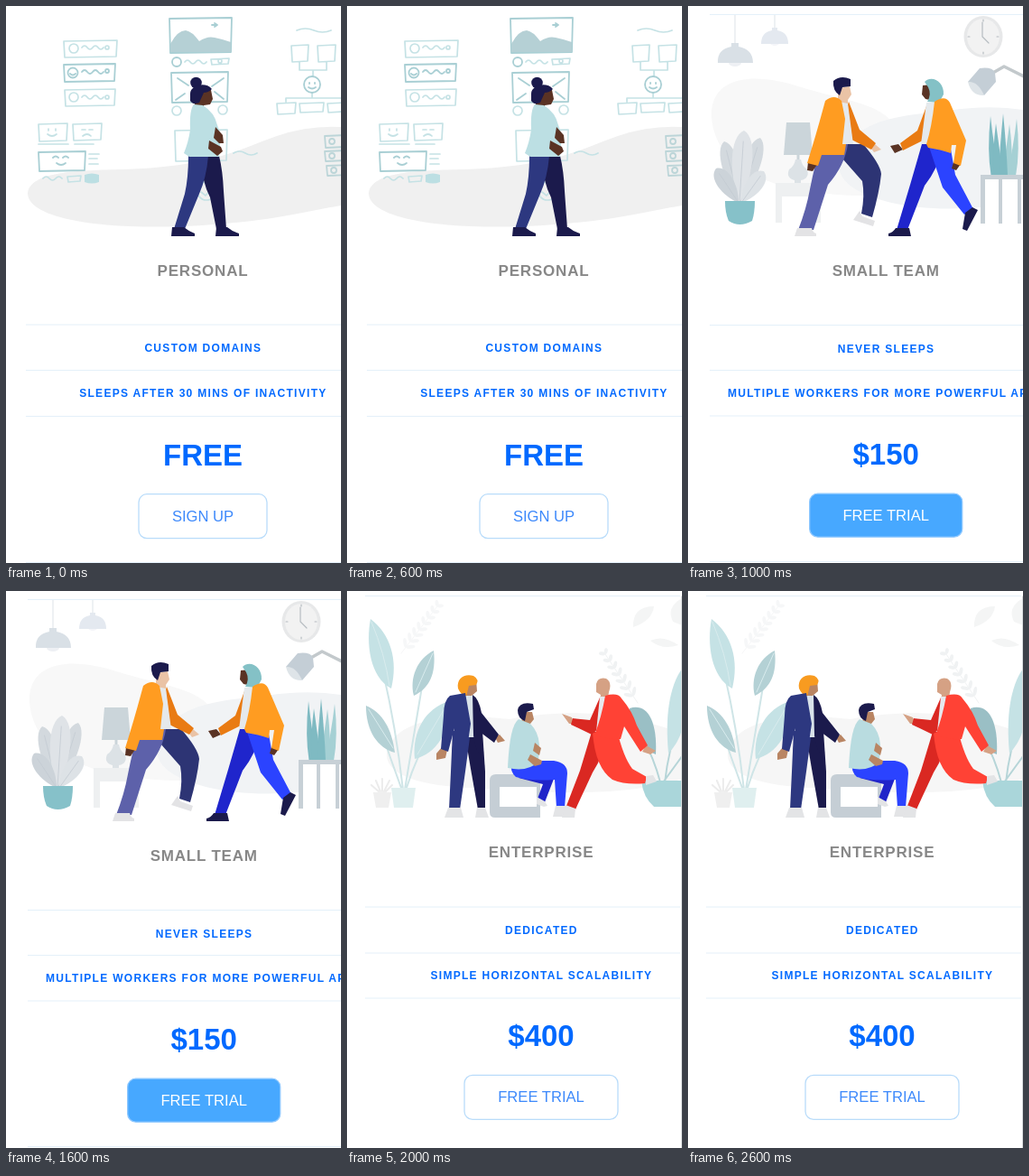
An HTML page that plays this animation: 371x617 px, repeating every 3 s.

```html
<!DOCTYPE html>
<html lang="en">
<head>
<meta charset="utf-8">
<title>Pricing plans</title>
<style>
html, body { margin: 0; width: 100%; height: 100%; overflow: hidden; background: #fff; }
svg { display: block; }
text { font-family: "Liberation Sans", Arial, sans-serif; text-anchor: middle; }
.title { font-size: 17px; font-weight: bold; letter-spacing: 0.8px; fill: #878787; }
.feature { font-size: 12px; font-weight: bold; letter-spacing: 1.3px; fill: #0069ff; }
.price { font-size: 33px; font-weight: bold; fill: #0069ff; }
.button { font-size: 16.6px; }
</style>
</head>
<body>
<svg id="stage" width="371" height="617" viewBox="0 0 371 617"></svg>
<script>
const fill = (color, d) => `<path fill="${color}" d="${d}"/>`;
const line = (color, width, d) =>
  `<path fill="none" stroke="${color}" stroke-width="${width}" stroke-linecap="round" stroke-linejoin="round" d="${d}"/>`;
const oval = (color, x, y, rx, ry = rx) => `<ellipse fill="${color}" cx="${x}" cy="${y}" rx="${rx}" ry="${ry}"/>`;
const text = (kind, x, y, label, color = "") =>
  `<text class="${kind}" x="${x}" y="${y}"${color && ` style="fill:${color}"`}>${label}</text>`;
const ring = (x, y, r) => `M${x - r} ${y}a${r} ${r} 0 1 1 ${2 * r} 0a${r} ${r} 0 1 1 ${-2 * r} 0`;
const box = (x, y, w, h) => `M${x} ${y + 1}L${x + w} ${y}L${x + w - 1} ${y + h - 1}L${x + 1} ${y + h}Z`;
const wave = (x, y, n, step = 6) => `M${x} ${y}q${step / 2} -4 ${step} 0` + `t${step} 0`.repeat(n - 1);

function fern(color, x, y, dx, dy, pairs) {
  let out = line(color, 1, `M${x} ${y}l${dx} ${dy}`);
  const tilt = Math.atan2(dy, dx) * 180 / Math.PI;
  for (let i = 1; i <= pairs; i++) {
    const k = i / pairs, size = 5.5 - 2 * k;
    for (const side of [-45, 45])
      out += `<g transform="translate(${x + dx * k} ${y + dy * k}) rotate(${tilt + side})">${oval(color, size, 0, size, 2)}</g>`;
  }
  return out;
}

// Rounded leaf from its base to its tip, w wide on each side
function leaf(color, bx, by, tx, ty, w) {
  const dx = tx - bx, dy = ty - by, len = Math.hypot(dx, dy);
  const nx = -dy / len * w, ny = dx / len * w;
  const at = (k, s) => `${bx + dx * k + nx * s} ${by + dy * k + ny * s}`;
  return fill(color, `M${bx} ${by}C${at(0.35, 1.2)} ${at(0.9, 1.5)} ${tx} ${ty}C${at(0.9, -1.5)} ${at(0.35, -1.2)} ${bx} ${by}`) +
    line("#c3cbd2", 0.8, `M${bx} ${by}L${at(0.85, 0)}`);
}

function plan({ left, cx, dy = 0, right = 371, rules, title, features, baselines, price, label, half, solid }) {
  const mid = cx + 0.4;
  const rule = rules.map(y => `M${left} ${y}H${right}`).join("");
  return `<path stroke="#e4f0f9" d="${rule}"/>` +
    text("title", mid - 0.4, 299 + dy, title) +
    features.map((f, i) => text("feature", mid, baselines[i], f)).join("") +
    text("price", cx, 508.5 + dy, price) +
    `<rect x="${cx - half}" y="${540.7 + dy}" width="${2 * half}" height="${solid ? 48 : 49}" rx="9"
      fill="${solid ? "#47a8ff" : "#fff"}" stroke="${solid ? "#8cc7ff" : "#b9dcfa"}" stroke-width="1.3"/>` +
    text("button", cx, 570.7 + dy, label, solid ? "#fff" : "#3d89fb");
}

const pale = "#c5e2e5", teal = "#a9cfd4", sky = "#bcdfe3", navy = "#2d3880", ink = "#1b1a4c", brown = "#5a3324";

function personalArt() {
  const light = [
    box(64, 38, 59, 19), box(65, 92, 56, 19), box(36, 130, 32, 20), box(74, 130, 32, 19),
    ring(75, 47, 5), wave(84, 46, 4), ring(112, 46, 2), ring(75, 101, 5), wave(84, 101, 4), ring(112, 101, 2),
    "M36 153H69M76 153H97M47 136v2M55 136v2M46 142q5 4 10 0M84 137h4M92 137h4M85 144q5-4 9 0",
    "M92 164h11M92 169h9M92 175h10", wave(41, 191, 3, 7), box(68, 188, 15, 7),
    box(187, 137, 58, 35), wave(252, 163, 2, 13), ring(222, 205, 10), "M216 206l5 4 8-9",
    wave(322, 27, 2, 19), box(316, 43, 19, 19), box(345, 43, 20, 19),
    "M325 62V71H355V62M340 71V78M339 96V102M310 106V102H371",
    box(300, 107, 21, 13), box(325, 107, 27, 11), box(356, 107, 20, 11),
    wave(198, 62, 4), box(227, 58, 20, 7), ring(237, 61, 2), ring(189, 116, 5), ring(240, 115, 5)
  ].join("");
  const dark = [
    box(64, 64, 57, 20), ring(74, 74, 5.5), "M71 75q3 3 6 0", wave(84, 73, 4), ring(112, 72, 2),
    box(36, 161, 52, 22), "M52 168q3-3 6 0M63 168q3-3 6 0M56 174q5 4 10 0",
    box(181, 13, 69, 39), ring(189, 62, 5), box(183, 73, 63, 34), "M190 80l12 8M241 80l-13 9M188 104l10-7M231 95l10 8",
    ring(339, 87, 9), "M336 85v1M342 85v1M335 90q4 3 8 0", "M228 21h6l-3-2m3 2l-3 2"
  ].join("");
  const edge = [box(353, 143, 24, 14), box(353, 160, 24, 12), box(355, 176, 24, 12),
    ring(361, 150, 3), ring(361, 166, 3), ring(363, 182, 3)].join("");
  return fill("#f0f0f0", "M24 208C26 183 80 182 130 181C230 178 262 157 300 144Q335 132 371 134V221C330 228 300 237 230 242C130 250 26 240 24 208Z") +
    line(pale, 1.7, light) + line(teal, 1.8, dark) + line("#bcd5d8", 1.8, edge) +
    fill("#b5d0d5", "M182 51V42Q190 27 199 27Q206 28 214 39Q223 33 231 35Q241 37 249 40V51Z") +
    fill(sky, "M87 187Q95 184 103 187V195Q95 198 87 195Z") +
    // walker
    fill(ink, "M215 166H236Q240 182 241 205L244 247H233L226 212Q217 195 215 166Z") +
    fill(navy, "M202 166H224Q222 190 214 208L198 247H186L198 208Q202 190 202 166Z") +
    fill(ink, "M184 245h13q6 5 12 7v3H183ZM233 245h12q6 5 13 7v3H232Z") +
    fill(brown, "M215 93H227L229 103L226 109L219 110L219 115L208 111Z") +
    oval(ink, 210.5, 85, 6.3) +
    fill(ink, "M204 97C204 88 221 83 228 92Q224 96 219 96L214 107Q207 110 204 105Z") +
    fill(sky, "M208 109L218 110Q231 118 234 132L238 143L236 167H203L197 163Q202 151 204 137Q203 115 208 109Z") +
    fill(brown, "M232 134L240 143L241 152L236 152L230 146ZM225 149L238 156L240 161L234 166L224 158Z");
}

function teamArt() {
  const blades = [[335, 122], [364, 125], [341, 130], [356, 131], [349, 119]];
  return fill("#f8f8f8", "M26 123C24 73 82 75 122 89C187 109 219 106 239 147C260 186 226 212 184 210C108 207 31 188 26 123Z") +
    fill("#f1f3f5", "M170 163C190 122 245 121 288 116Q333 109 371 115V216C313 228 239 229 193 207Q158 190 170 163Z") +
    line("#dde3e8", 1, "M52 10V42M96 10V25") +
    oval("#eef0f4", 52, 63, 7, 4) + oval("#f4f5f9", 96, 41, 5, 3) +
    fill("#d9e0e6", "M48 41h8v4Q72 48 72 63H33Q32 48 48 45Z") +
    fill("#e4e9f0", "M93 24h6v3Q111 29 111 42H81Q81 29 93 27Z") +
    oval("#e7e8e9", 327, 34, 21.5, 23) + oval("#f2f2f2", 327, 34, 18, 20) +
    line("#b6bcc1", 1.2, "M326 18V34L333 41M327 15v2M327 51v2M310 34h2M342 34h2") +
    line("#c3c9cc", 3.5, "M336 75L350 67L372 78") +
    fill("#c4ced6", "M310 84L323 69Q337 67 340 74L341 84L328 99Z") + fill("#dee4e8", "M310 84Q321 83 328 99Q314 100 310 84") +
    leaf("#d3d9de", 57, 217, 40, 150, 9) + leaf("#d3d9de", 58, 217, 80, 146, 9) +
    leaf("#dfe3e7", 57, 218, 62, 138, 11) + leaf("#ccd3d9", 56, 218, 31, 180, 9) + leaf("#dde2e6", 59, 218, 84, 183, 9) +
    fill("#86c1c9", "M41 216H74Q74 229 71 238Q57 246 45 238Q41 229 41 216Z") +
    fill("#eef0f1", "M97 196H147V240H141V211H104V240H97Z") +
    fill("#cbd5da", "M109 129H135L138 165H106Z") + line("#cbd5da", 3, "M122 165V174") +
    fill("#dce2e6", "M119 170h6Q126 177 132 181Q135 191 125 193v3h-7v-3Q108 190 112 181Q118 177 119 170") +
    blades.map(([x, y], i) => {
      const base = 349 + (x - 349) * 0.6;
      return fill(i % 2 ? "#a5d0d4" : "#7fbac2", `M${base - 5} 188Q${x - 4} 160 ${x} ${y}Q${x + 4} 160 ${base + 5} 188Z`);
    }).join("") +
    fill("#fff", "M326 190H371V241H326Z") +
    fill("#c7d0d6", "M324 187H371V192H324ZM324 192h5V241h-5ZM344 192h4V241h-4ZM365 192h4V241h-4Z") +
    // left partner
    fill("#2d3474", "M172 153H194Q213 175 214 186Q212 206 204 234L192 230Q196 210 193 194L171 169Z") +
    fill("#5d61aa", "M148 153H177Q174 176 155 198L139 248H122Q131 225 135 203Q141 172 148 153Z") +
    fill("#e3e3e5", "M121 246h16q1 5 5 6v3H118ZM190 227l3 6 14 5-2 6-22-7Z") +
    fill("#eac3a6", "M166 91L179 89L181 98L177 104L177 110L166 107Z") +
    fill(ink, "M161 83Q169 76 180 81V89L171 90L168 99Q160 94 161 83Z") +
    fill("#eac3a6", "M201 155L207 153L214 159L206 162Z") + fill(brown, "M133 173L144 174L138 183L132 182Z") +
    fill("#e97b13", "M178 106L190 137L208 152L203 159L181 148L173 122Z") +
    fill("#e5e9ec", "M167 106L177 108L183 153H165Z") +
    fill("#ff9c21", "M152 105Q162 97 170 105L174 125L171 153H175L173 165H148L144 177L132 174Q142 142 149 116Z") +
    // right partner
    fill("#1f25cc", "M259 153H284Q277 180 262 199L243 248H231L246 198Z") +
    fill("#2b43ff", "M266 153H290L296 187L316 225L306 231L282 201Z") +
    fill(ink, "M230 246h15l2 9H222v-3q5-1 8-6ZM315 223l6 3-12 23-5-2 3-18Z") +
    fill(brown, "M260 88L270 87L272 105L263 103L259 98ZM224 155L233 153L238 159L229 163ZM294 173l8 2-5 7-5-2Z") +
    fill("#84c1c6", "M262 84C270 76 284 84 283 98L278 107L265 106Q270 98 266 90Z") +
    fill("#e97b13", "M264 111L254 138L235 152L238 160L260 149L272 125Z") +
    fill("#e5e9ec", "M264 107H275L272 153H258Z") +
    fill("#ff9c21", "M273 106Q285 98 290 107L308 149L302 177L294 174L297 154H292L291 163Q280 159 266 157L264 153Q270 134 273 106Z");
}

function enterpriseArt() {
  const skin = "#b98563", tan = "#d5a184", red = "#ff4235", maroon = "#da2822";
  return fill("#f6f6f6", "M44 180C50 142 113 135 180 142C260 127 323 139 371 158V208C310 229 210 224 139 218C84 216 43 205 44 180Z") +
    fern("#f6f7f8", 60, 69, 40, -52, 8) + fern("#f0f2f3", 322, 124, -36, -54, 7) +
    fill("#f4f5f5", "M317 40Q316 17 340 17Q338 33 317 40ZM371 8Q353 18 361 34L371 38ZM336 55Q350 48 367 60Q349 66 336 55Z") +
    line("#cfe5e7", 2, "M62 220Q54 150 40 90M64 220Q73 165 84 100M60 218Q48 185 36 150M66 218Q76 185 98 146") +
    fill(pale, "M26 31C48 47 57 77 49 108C25 95 21 58 26 31ZM113 122C114 158 99 180 75 186C72 155 87 130 113 122Z") +
    fill("#b4d1d5", "M96 66C99 92 91 108 74 116C69 96 78 75 96 66ZM21 127C39 134 50 153 53 179C34 174 21 155 21 127Z") +
    line("#d9ecee", 1, "M27 34Q42 70 47 105M95 69L76 112M24 131L51 174M111 125L78 181") +
    fill("#dfefef", "M49 218H76L73 240H52Z") + fill("#efefef", "M29 223H49L46 240H32Z") +
    line("#ececec", 2, "M39 222V208M37 222L32 210M41 222L47 210M35 222L27 215M43 222L50 215") +
    line("#b6d5d8", 2, "M347 212Q340 185 326 160M352 212Q356 175 368 145M350 212L371 183") +
    fill("#9abfc5", "M313 130C331 124 344 141 342 181C323 174 312 154 313 130Z") +
    fill(pale, "M371 86C357 106 352 139 356 180Q367 168 371 154Z") +
    fill("#aad6da", "M326 210H371V239H340Q328 229 326 210Z") +
    fill("#c5ced5", "M165 203H207Q214 203 214 210V251H164Q158 251 158 245V210Q158 203 165 203Z") +
    fill("#fff", "M169 217H210V239H169Z") +
    // standing
    fill(ink, "M130 155H150L153 200V242H145L137 197Z") + fill(navy, "M117 155H137L131 200L125 242H113L115 200Z") +
    fill("#e3e4e6", "M112 240h14l3 11H108ZM144 240h9l4 11H142Z") +
    fill(skin, "M133 98H143L144 111L138 116V121L129 115ZM105 173L111 176L109 185L99 187L99 180ZM164 162L169 159L175 166L167 168Z") +
    fill("#f89b20", "M123 108C121 97 130 91 140 94Q147 98 143 104L135 105L132 117Q126 115 123 108Z") +
    fill("#d9e2e9", "M131 116H140L146 162H133Z") +
    fill(ink, "M139 115Q146 119 149 135L168 159L163 168L147 156L150 182Q143 181 140 160Z") +
    fill(navy, "M114 116L131 113L137 147L132 181H116L119 152L112 178L104 175L107 138Q107 121 114 116Z") +
    // seated
    fill("#2024c9", "M202 193L231 203L219 234L211 230L217 214L190 207Z") +
    fill("#2b43ff", "M182 188H229Q244 190 244 202L241 240H232L230 209Q203 211 187 206Q180 200 182 188Z") +
    fill("#e3e4e6", "M210 228l9 5 3 5-4 1-8-3ZM231 238h11q3 5 8 8v4h-22Z") +
    fill(skin, "M195 134H205L207 142L203 147V154L193 146Z") +
    fill(ink, "M189 132Q191 122 206 125L207 131L199 134L197 144Q189 141 189 132Z") +
    fill("#b9dce0", "M190 142L203 147Q212 156 213 170L212 189Q200 201 178 196Q180 149 190 142Z") +
    fill(skin, "M208 168L215 174L213 182L206 177ZM203 181L216 188L215 192L208 194L200 187Z") +
    // striding
    fill(maroon, "M271 156H288Q285 181 272 201L253 242L243 238L258 199Z") +
    fill(red, "M272 157L299 154Q306 184 316 197L332 206L330 213Q308 215 294 209Q275 196 272 157Z") +
    fill("#e3e4e6", "M242 237l11 4-1 10H238ZM331 205l8-1 4 7-12 4Z") +
    fill(tan, "M276 103Q278 95 287 97Q294 101 290 112L289 119L280 121L281 115L276 112ZM238 136L249 140L252 147L246 147ZM331 171L342 177L336 181L327 178Z") +
    fill(maroon, "M280 118L269 143L250 141L248 148L271 159L281 150Z") +
    fill("#e7e9ee", "M280 117H286L283 156H276Z") +
    fill(red, "M286 116Q300 112 304 119Q316 133 321 149L333 171L325 178L307 150L303 164Q291 165 274 160Q282 139 286 116Z") +
    line("#d4d8da", 1, "M370.5 6V617");
}

const plans = [
  personalArt() + plan({ left: 22, cx: 218, rules: [353, 403.5, 454.5, 616.5], title: "PERSONAL",
    features: ["CUSTOM DOMAINS", "SLEEPS AFTER 30 MINS OF INACTIVITY"], baselines: [383, 433],
    price: "FREE", label: "SIGN UP", half: 71 }),
  teamArt() + plan({ left: 24, cx: 219.2, dy: -0.5, rules: [9.5, 353.5, 403.5, 454, 615.5], title: "SMALL TEAM",
    features: ["NEVER SLEEPS", "MULTIPLE WORKERS FOR MORE POWERFUL APPS"], baselines: [384, 433],
    price: "$150", label: "FREE TRIAL", half: 84.5, solid: true }),
  enterpriseArt() + plan({ left: 20, cx: 215, dy: -4.3, right: 369, rules: [5.5, 350, 401, 451], title: "ENTERPRISE",
    features: ["DEDICATED", "SIMPLE HORIZONTAL SCALABILITY"], baselines: [380, 430],
    price: "$400", label: "FREE TRIAL", half: 85 })
];

const stage = document.getElementById("stage");
stage.innerHTML = plans.map(p => `<g display="none">${p}</g>`).join("");
const groups = [...stage.children];
const start = performance.now();

function draw() {
  const current = Math.floor((performance.now() - start) / 1000) % plans.length;
  groups.forEach((g, i) => g.setAttribute("display", i === current ? "inline" : "none"));
  requestAnimationFrame(draw);
}
draw();
</script>
</body>
</html>
```
